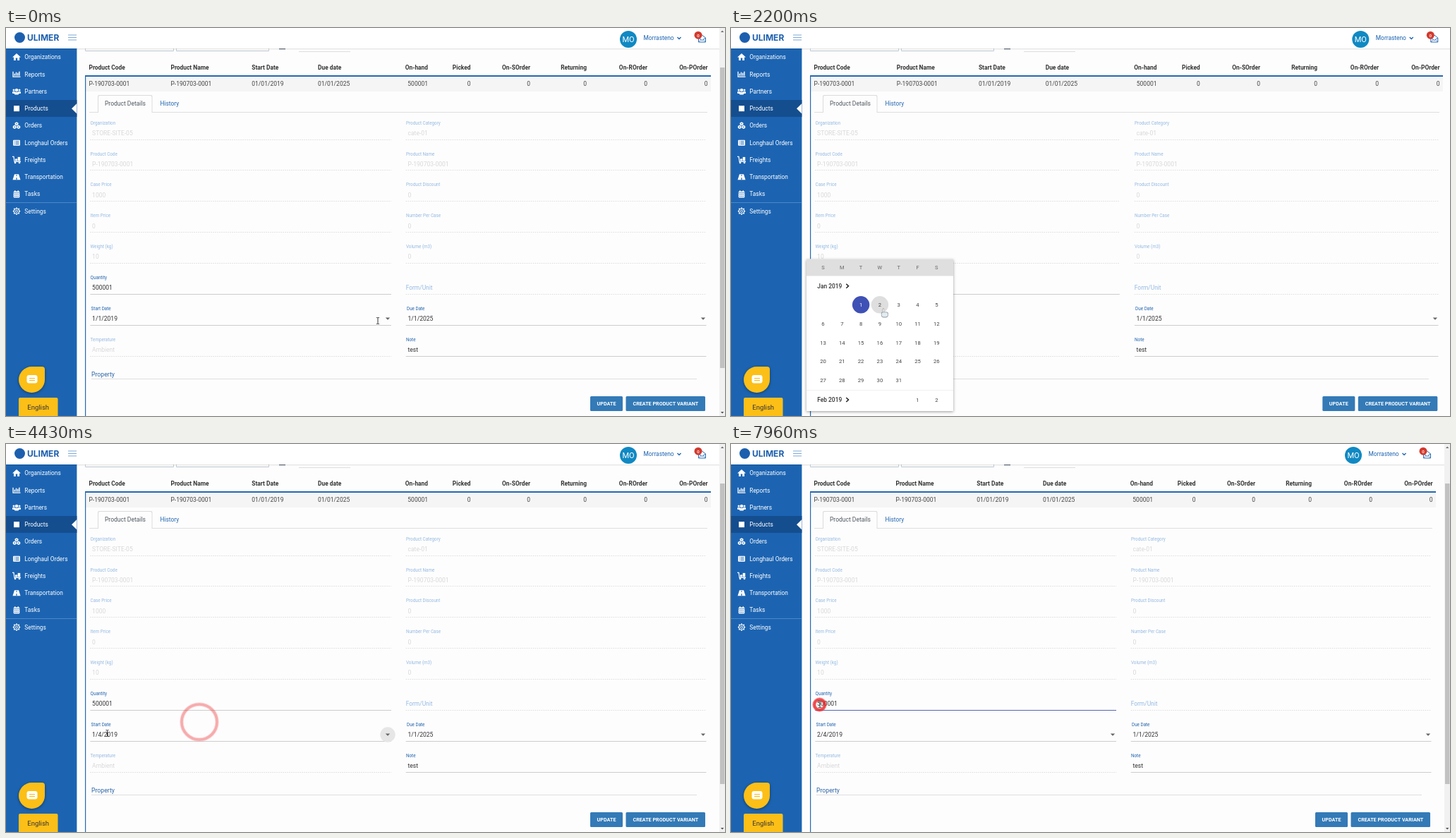
These frames come from a looping animation (1019 by 550 pixels, 8 s). An HTML page with a canvas:

```html
<!DOCTYPE html>
<html lang="en">
<head>
<meta charset="utf-8">
<title>Product details</title>
<style>
  html, body { margin: 0; width: 100%; height: 100%; overflow: hidden; background: #fdfdfd; }
  canvas { display: block; width: 1019px; height: 550px; }
</style>
</head>
<body>
<canvas id="stage"></canvas>
<script>
const W = 1019, H = 550, LOOP = 8000;
const canvas = document.getElementById('stage');
const c = canvas.getContext('2d');
const dpr = window.devicePixelRatio || 1;
canvas.width = W * dpr;
canvas.height = H * dpr;

const BLUE = '#1c64b2', INK = '#3c3c3c', PAGE = '#fdfdfd', YELLOW = '#fcbf17';
const OPEN = 620, CLOSE = 3520;
const CLICKS = [[500, 538, 415], [3360, 274, 394], [5030, 127, 414], [7660, 125.5, 369.5]];
const PATH = [
  [0, 527, 415], [30, 527, 415], [330, 538, 415], [1230, 538, 415], [1330, 526, 414],
  [2130, 215, 398], [2830, 215, 398], [3100, 273, 394], [4180, 273, 394], [4430, 143.5, 410],
  [5000, 127, 413], [5200, 127, 413], [5600, 129.5, 404.5], [7659, 129.5, 404.5], [7660, 126, 369]
];

const clamp = v => Math.max(0, Math.min(1, v));
const smooth = v => v * v * (3 - 2 * v);

function rect(x, y, w, h, fill) {
  c.fillStyle = fill;
  c.fillRect(x, y, w, h);
}
function round(x, y, w, h, r, fill) {
  c.fillStyle = fill;
  c.beginPath();
  c.roundRect(x, y, w, h, r);
  c.fill();
}
function disc(x, y, r, fill) {
  c.fillStyle = fill;
  c.beginPath();
  c.arc(x, y, r, 0, 7);
  c.fill();
}
function trace(points, closed) {
  c.beginPath();
  points.forEach(([x, y], i) => i ? c.lineTo(x, y) : c.moveTo(x, y));
  if (closed) c.closePath();
}
function poly(points, fill) {
  trace(points, true);
  c.fillStyle = fill;
  c.fill();
}
function line(points, color, width = 1) {
  trace(points);
  c.strokeStyle = color;
  c.lineWidth = width;
  c.stroke();
}
function text(s, x, y, size = 8.4, fill = INK, weight = 400, align = 'left', family = 'Roboto') {
  c.font = `${weight} ${size}px ${family}, sans-serif`;
  c.textAlign = align;
  c.fillStyle = fill;
  c.fillText(s, x, y + size * 0.36);
}
function shadow(alpha, blur) {
  c.shadowColor = `rgba(0,0,0,${alpha})`;
  c.shadowBlur = blur * dpr;
  c.shadowOffsetY = dpr;
}

// Icons are drawn around their own centre.
const ICONS = {
  Organizations() {
    poly([[-6, 0], [0, -5.5], [6, 0], [4, 0], [4, 4.5], [1.2, 4.5], [1.2, 1], [-1.2, 1], [-1.2, 4.5], [-4, 4.5], [-4, 0]], '#fff');
  },
  Reports() {
    line([[-5, -4], [-5, 3.5], [5.5, 3.5]], '#fff', 1.3);
    [3, 5, 4, 6].forEach((h, i) => rect(-3.4 + i * 2.2, 2 - h, 1.4, h, '#fff'));
  },
  Partners() {
    for (const x of [-4, 4]) { disc(x, -2, 1.5, '#fff'); round(x - 2, 0, 4, 3, 1, '#fff'); }
    disc(0, -2, 2.2, '#fff');
    round(-3.2, 0.8, 6.4, 3.7, 1.5, '#fff');
  },
  Products() { rect(-4, -4, 8, 8, '#fff'); },
  Orders() {
    for (const [x, y] of [[0, -2.6], [-2.8, 2], [2.8, 2]]) {
      poly([[x, y - 2.6], [x + 2.4, y - 1.3], [x + 2.4, y + 1.4], [x, y + 2.5], [x - 2.4, y + 1.4], [x - 2.4, y - 1.3]], '#fff');
      disc(x, y, 0.8, BLUE);
    }
  },
  'Longhaul Orders'() {
    round(-5, -4, 10, 8, 1, '#fff');
    for (const y of [-2, 0, 2]) { rect(-3.5, y - 0.4, 1, 0.9, BLUE); rect(-1.5, y - 0.4, 5, 0.9, BLUE); }
  },
  Freights() {
    line([[-6, -4.5], [-4, -4.5], [-3, 2.5], [6, 2.5]], '#fff', 1.2);
    rect(-2, -1.5, 3.2, 3, '#fff');
    rect(1.7, -4, 3.5, 5.5, '#fff');
    disc(-2, 4, 1.3, '#fff');
    disc(4, 4, 1.3, '#fff');
  },
  Transportation() {
    poly([[-3, -4], [3, -4], [5.5, 4], [-5.5, 4]], '#fff');
    rect(-0.5, -3, 1, 2, BLUE);
    rect(-0.6, 1, 1.2, 3, BLUE);
  },
  Tasks() {
    round(-4.3, -4, 8.6, 9, 1, '#fff');
    rect(-2.8, -5.2, 1.2, 2, '#fff');
    rect(1.6, -5.2, 1.2, 2, '#fff');
    rect(-4.3, -2, 8.6, 0.7, BLUE);
    for (let i = 0; i < 6; i++) rect(-3 + (i % 3) * 2.3, (i / 3 | 0) * 2.5, 1.2, 1.2, BLUE);
  },
  Settings() {
    for (let i = 0; i < 8; i++) {
      const a = i * Math.PI / 4;
      line([[3.6 * Math.cos(a), 3.6 * Math.sin(a)], [5.2 * Math.cos(a), 5.2 * Math.sin(a)]], '#fff', 1.7);
    }
    c.lineWidth = 1;
    for (const r of [3.8, 1.6]) { c.beginPath(); c.arc(0, 0, r, 0, 7); c.stroke(); }
  }
};

function sidebar() {
  rect(0, 29, 100.4, H, BLUE);
  rect(0, 102, 100.4, 24, '#144e8f');
  poly([[100.4, 107], [100.4, 121.5], [93, 114.3]], PAGE);
  Object.keys(ICONS).forEach((name, i) => {
    const y = 41.4 + i * 24.25;
    c.save();
    c.translate(15, y);
    ICONS[name]();
    c.restore();
    text(name, 26.3, y, 8.35, '#fff');
  });
  rect(0, 247, 100, 1, '#4a86c6');
  c.save();
  shadow(0.4, 4);
  round(18, 480, 37, 37, [18.5, 4, 18.5, 18.5], YELLOW);
  c.restore();
  round(29.5, 492, 15, 11.5, 3, '#fff');
  rect(33, 496, 8, 1.2, YELLOW);
  rect(33, 499, 8, 1.2, YELLOW);
  round(18, 524, 55.5, 28, 2, YELLOW);
  text('English', 45.7, 537.5, 9.5, '#333', 400, 'center');
}

function header(shift) {
  rect(0, 0, W, 29, '#fff');
  rect(0, 29, W, 1, 'rgba(0,0,0,.09)');
  rect(0, 30, W, 1, 'rgba(0,0,0,.03)');
  disc(19.5, 13.5, 7.5, '#1c5fae');
  text('ULIMER', 30, 13.5, 12, '#1c5fae', 700, 'left', 'Inter');
  for (const y of [9.5, 13, 16.5]) rect(88, y, 12, 0.9, '#6f9fd3');
  c.save();
  c.translate(shift, 0);
  disc(882, 16, 12, '#1089c3');
  text('MO', 882, 16.5, 11, '#fff', 400, 'center');
  text('Morrasteno', 903.5, 14, 8.4, '#1c64b2');
  line([[951.5, 13], [954, 15.5], [956.5, 13]], '#1c64b2', 1.3);
  line([[981.5, 14], [986.5, 10], [991.5, 14], [991.5, 20], [981.5, 20], [981.5, 14], [986.5, 17.5], [991.5, 14]], '#2b6cb5');
  line([[981.5, 20], [985, 16.5]], '#2b6cb5', 0.8);
  line([[991.5, 20], [988, 16.5]], '#2b6cb5', 0.8);
  disc(981, 10.2, 5.5, '#d23a2e');
  text('0', 981, 10.4, 6.2, '#fff', 500, 'center');
  c.restore();
}

function table(X) {
  rect(112, 32, 126, 1, '#bcc6d2');
  rect(241, 32, 132, 1, '#bcc6d2');
  for (const x of [112, 237, 241, 372]) rect(x, 29, 1, 4, '#c6d0da');
  rect(387, 29, 9, 1.3, '#6a7684');
  rect(415, 33, 73, 1, '#ddd');
  rect(112, 69, X(999) - 112, 21, '#f5f5f5');
  rect(112, 67, X(999) - 112, 2, '#2468b0');
  rect(112, 69, 1.2, H, '#2468b0');
  const left = [['Product Code', 'P-190703-0001', 117.5], ['Product Name', 'P-190703-0001', 233.5],
    ['Start Date', '01/01/2019', 348.3], ['Due date', '01/01/2025', 442]];
  const right = [['On-hand', '500001', 598], ['Picked', '0', 658.5], ['On-SOrder', '0', 743],
    ['Returning', '0', 823], ['On-ROrder', '0', 909], ['On-POrder', '0', 994.5]];
  const put = (cols, align) => cols.forEach(([head, value, x]) => {
    text(head, X(x), 56, 8.4, '#333', 700, align);
    text(value, X(x), 79, 8.5, '#444', 400, align);
  });
  put(left, 'left');
  put(right, 'right');
  rect(118, 119, X(994) - 118, 1, '#dedede');
  round(130, 95, 77.5, 25, [2, 2, 0, 0], '#dcdcdc');
  round(131, 96, 75.5, 25, [2, 2, 0, 0], PAGE);
  text('Product Details', 140, 107, 8.5, '#505860');
  text('History', 218.5, 107, 8.4, '#2468b0');
}

function dropdown(x, y) {
  poly([[x - 3.2, y - 1.4], [x + 3.2, y - 1.4], [x, y + 1.8]], '#666');
}

const lineY = row => Math.floor(158.1 + row * 43.85);

function field(x0, x1, row, label, value, enabled) {
  const y = 134.5 + row * 43.85, inset = label === 'Start Date' || label === 'Due Date' ? 1.3 : 0.3;
  text(label, x0 + inset, y, 6.3, enabled ? '#1f62ae' : '#94b9e2');
  text(value, x0 + 2.8, y + 14.4, 8.55, enabled ? '#333' : '#d8d8d8');
  underline(x0, x1, row, enabled);
}

function underline(x0, x1, row, enabled) {
  const y = lineY(row);
  if (enabled) return rect(x0, y, x1 - x0, 1, '#cdcdcd');
  c.setLineDash([1.5, 1.5]);
  line([[x0, y + 0.5], [x1, y + 0.5]], '#dcdcdc');
  c.setLineDash([]);
}

function focusLine(x0, x1, row, p) {
  const half = (x1 - x0) / 2 * smooth(clamp(p));
  rect((x0 + x1) / 2 - half, lineY(row), half * 2, 1, '#5468b0');
}

function form(t, X, shift, open) {
  const a = 119.3, b = X(546), d = X(566.7), e = X(992.5);
  const date = t < CLOSE ? '1/1/2019' : t < 6560 ? '1/4/2019' : t < 7160 ? '/4/2019' : '2/4/2019';
  [['Organization', 'STORE-SITE-05'], ['Product Code', 'P-190703-0001'], ['Case Price', '1000'],
    ['Item Price', '0'], ['Weight (kg)', '10'], ['Quantity', '500001', true],
    open ? null : ['Start Date', date, true], ['Temperature', 'Ambient']
  ].forEach((f, i) => f && field(a, b, i, ...f));
  [['Product Category', 'cate-01'], ['Product Name', 'P-190703-0001'], ['Product Discount', '0'],
    ['Number Per Case', '0'], ['Volume (m3)', '0'], null,
    ['Due Date', '1/1/2025', true], ['Note', 'test', true]
  ].forEach((f, i) => f && field(d, e, i, ...f));
  text('Form/Unit', d, 368, 8.4, '#94b9e2');
  underline(d, e, 5, false);

  if (t >= 5130 && t < 7700) focusLine(a, b, 6, (t - 5130) / 250);
  if (t >= 7700) focusLine(a, b, 5, (t - 7700) / 200);
  if (t >= CLOSE && t < 5110) disc(b - 5, 412, 10.7, '#e6e6e6');
  if (!open) dropdown(b - 5, 412);
  dropdown(e - 4.5, 412);

  text('Property', 121, 491, 8.7, '#2d66a8');
  rect(121, 497, X(979) - 121, 1, '#dedede');
  round(828 + shift, 522, 46, 21, 1.5, '#337ab7');
  round(878.5 + shift, 522, 112.5, 21, 1.5, '#337ab7');
  text('UPDATE', 851 + shift, 532.5, 7.2, '#fff', 700, 'center');
  text('CREATE PRODUCT VARIANT', 934.8 + shift, 532.5, 7.2, '#fff', 700, 'center');
}

function scrollbar() {
  rect(1011, 0, 8, H, '#f1f1f1');
  rect(1012, 56, 6.5, 426, '#c1c1c1');
  poly([[1013, 6], [1017.4, 6], [1015.2, 3.5]], '#707070');
  poly([[1013, 544], [1017.4, 544], [1015.2, 546.5]], '#505050');
}

function calendar(t, pointer) {
  const appear = clamp((t - OPEN) / 120), leave = clamp((t - CLOSE + 40) / 40);
  const dy = t < 1363 ? -5.5 : 0;
  c.save();
  c.globalAlpha = appear * (1 - leave);
  c.translate(0, 327);
  c.scale(1, 0.8 + 0.2 * appear);
  c.translate(0, -327);
  shadow(0.4, 4);
  rect(107, 327.5, 208, 215.5, '#fff');
  c.shadowColor = 'transparent';
  rect(107, 327.5, 208, 24, '#dfdfdf');
  const colX = i => 130.5 + i * 26.8;
  [...'SMTWTFS'].forEach((s, i) => text(s, colX(i), 339.3, 7.5, '#666', 400, 'center'));
  c.beginPath();
  c.rect(107, 351.5, 208, 191.5);
  c.clip();
  const month = (name, y) => {
    text(name, 122.3, y, 8.4, '#333', 500);
    line([[163.3, y - 3], [166.5, y], [163.3, y + 3]], '#222', 1.5);
  };
  month('Jan 2019', 365.7 + dy);
  for (let day = 1; day <= 31; day++) {
    const x = colX((day + 1) % 7), y = 392.3 + Math.floor((day + 1) / 7) * 26.75 + dy;
    const hover = Math.abs(pointer.x - x) < 13.4 && Math.abs(pointer.y - y) < 13.4;
    if (day === 1) disc(x, y, 12.2, '#3f51b5');
    else if (hover) disc(x, y, 12.2, '#dedede');
    text(day, x, y, 7.7, day === 1 ? '#fff' : '#444', 400, 'center');
  }
  rect(107, 513 + dy, 208, 1, '#f0f0f0');
  month('Feb 2019', 527 + dy);
  text('1', colX(5), 527 + dy, 7.7, '#444', 400, 'center');
  text('2', colX(6), 527 + dy, 7.7, '#444', 400, 'center');
  c.restore();
}

function clickRing(t, [start, x, y]) {
  const age = t - start;
  if (age < 0 || age > 1200) return;
  const outer = 3.4 + age * 0.0228, width = Math.min(outer, 5.5);
  c.save();
  c.globalAlpha = Math.sqrt(1 - age / 1200);
  const stroke = (w, color) => {
    c.beginPath();
    c.arc(x, y, outer - width / 2, 0, 7);
    c.lineWidth = w;
    c.strokeStyle = color;
    c.stroke();
  };
  stroke(width, 'rgba(240,50,50,.5)');
  stroke(width * 0.65, 'rgba(228,24,32,.75)');
  c.restore();
}

function pointerAt(t) {
  let i = PATH.length - 1;
  while (PATH[i][0] > t) i--;
  const [t0, x0, y0] = PATH[i], [t1, x1, y1] = PATH[i + 1] || [LOOP, x0, y0];
  const p = smooth(clamp((t - t0) / (t1 - t0)));
  return { x: x0 + (x1 - x0) * p, y: y0 + (y1 - y0) * p };
}

function cursor(t, { x, y }) {
  c.save();
  c.translate(x, y);
  if (t < 150 || t >= CLOSE) {
    line([[-2, -4.5], [-0.6, -4.5], [0, -4], [0.6, -4.5], [2, -4.5]], '#333', 0.9);
    line([[-2, 4.5], [-0.6, 4.5], [0, 4], [0.6, 4.5], [2, 4.5]], '#333', 0.9);
    line([[0, -4], [0, 4]], '#333', 1);
  } else if (t < 700 || t >= 2200) {
    round(-0.3, -0.5, 2.4, 8, 1.2, '#777');
    round(0.2, 0, 1.5, 8, 0.8, '#fff');
    round(-2.2, 4.6, 10, 8, [2, 2, 4, 4], '#8b989f');
    round(-1.5, 5.2, 8.6, 6.4, [2, 2, 3, 3], '#e2ecf1');
  } else {
    const tip = [[0, 0], [3.5, 1], [9, 7.5], [8.5, 12.5], [3, 12], [0.5, 8]];
    poly(tip, '#e4e4e4');
    line([...tip, tip[0]], '#777', 1);
  }
  c.restore();
}

function draw(t) {
  const open = t >= OPEN && t < CLOSE;
  const shift = open ? 10.3 : 0;
  const X = x => open ? 113 + (x - 113) * 896 / 886 : x;
  const pointer = pointerAt(t);
  c.setTransform(dpr, 0, 0, dpr, 0, 0);
  rect(0, 0, W, H, PAGE);
  table(X);
  form(t, X, shift, open);
  sidebar();
  header(shift);
  if (open) calendar(t, pointer);
  else scrollbar();
  cursor(t, pointer);
  CLICKS.forEach(click => clickRing(t, click));
}

let begin;
function tick(now) {
  begin ??= now;
  draw((now - begin) % LOOP);
  requestAnimationFrame(tick);
}
draw(0);
requestAnimationFrame(tick);
</script>
</body>
</html>
```
